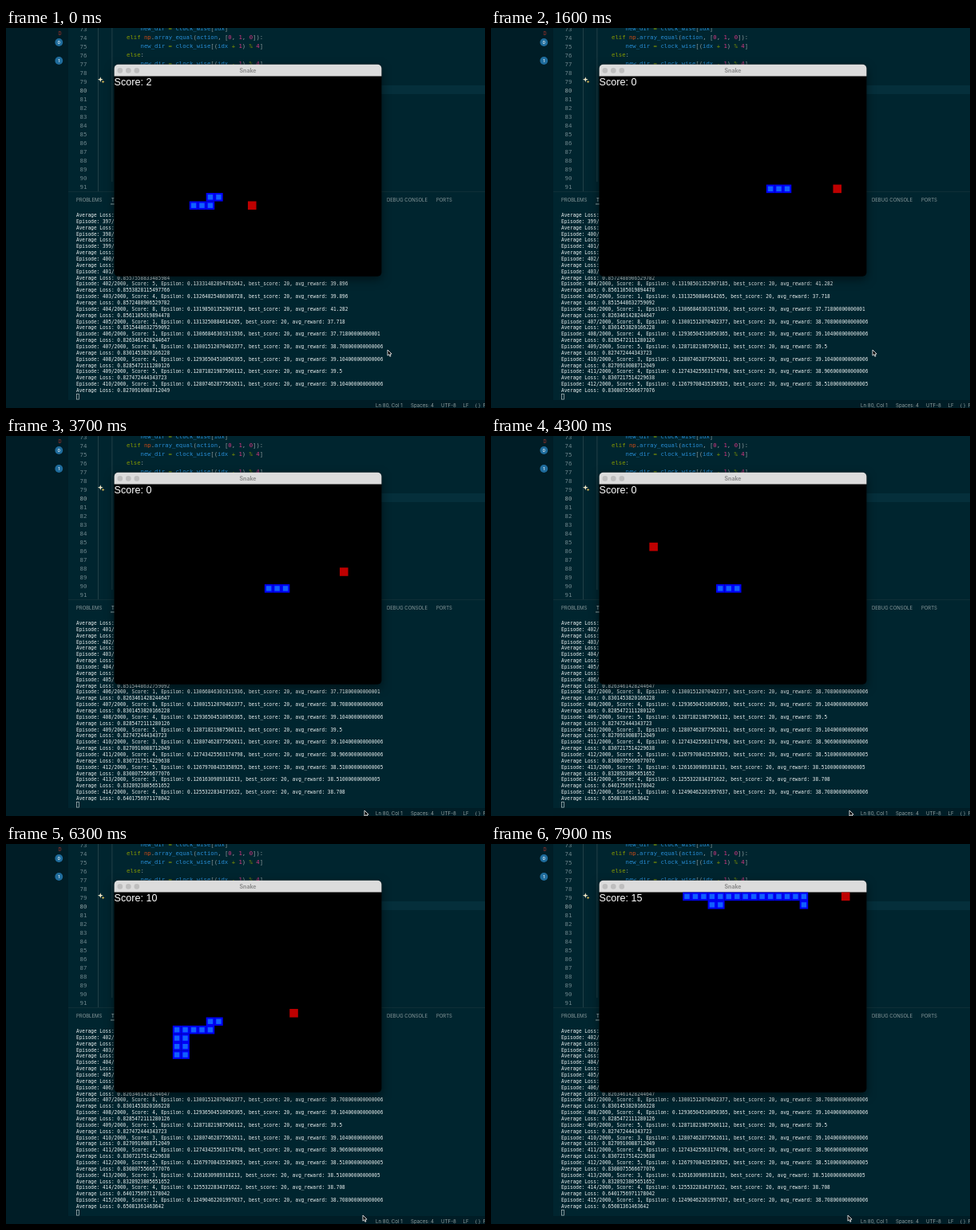
An HTML page with a canvas that plays this animation: 600 px wide and 477 px high, repeating every 8 s.

```html
<!DOCTYPE html>
<html lang="en">
<head>
<meta charset="utf-8">
<title>Snake training</title>
<style>
  html, body { margin: 0; width: 100%; height: 100%; overflow: hidden; background: #00252f; }
  canvas { display: block; width: 600px; height: 477px; }
</style>
</head>
<body>
<canvas id="stage" width="600" height="477"></canvas>
<script>
const ctx = document.getElementById('stage').getContext('2d');
const LOOP = 8000, TICK = 100;
const MONO = '"DejaVu Sans Mono", monospace';
const UI = 'Inter, sans-serif';
const ARIAL = '"Liberation Sans", Arial, sans-serif';

let seed = 7;
const random = () => (seed = (seed * 16807) % 2147483647) / 2147483647;

// Each stop: time, meals on the way, pose from tail to head, food in view.
// A stop without a pose is where the game ends.
const START = '14,12 16,12';
const EPISODES = [
  [[0, 0, '9,15 11,15 11,14 12,14', '16,15'], [600, 2]],
  [[600, 0, START], [1530, 5]],
  [[1530, 0, START], [1600, 0, '17,12 17,13 22,13', '28,13'], [2500, 3]],
  [[2500, 0, START], [2800, 1, '3,11 6,11', '12,11'], [3650, 3]],
  [[3650, 0, START], [3700, 0, '20,12', '27,10'], [4300, 1]],
  [[4300, 0, START],
   [5100, 3, '27,12 27,11 26,11 26,9 25,9', '8,9'],
   [6300, 7, '8,17 8,19 7,19 7,16 11,16 11,15 12,15', '21,14'],
   [7900, 5, '10,0 13,0 13,1 14,1 14,0 24,0 24,1', '29,0'],
   [LOOP, 0]]
].map(buildEpisode);

// score, average reward, average loss
const FIRST = 402, DECAY = 0.995;
let epsilon = 0.13331482894782642;
const LOG = `5 39.896 0.8553828115497766
4 39.896 0.8572488906529782
8 41.282 0.8561105019894478
1 37.718 0.8515448632759092
1 37.71800000000001 0.8263461428244647
8 38.708000000000006 0.8301453820166228
4 39.104000000000006 0.8285472111280126
5 39.5 0.827472444343723
3 39.104000000000006 0.8270910088712049
4 38.906000000000006 0.8307217514229638
5 38.510000000000005 0.8308075566677076
3 38.510000000000005 0.8328923805651652
4 38.708 0.6401756971178042
1 38.708000000000006 0.65081361463642`.split('\n').map((row, i) => {
  const [score, reward, loss] = row.split(' ');
  if (i) epsilon *= DECAY;
  return { loss, stats: `Score: ${score}, Epsilon: ${epsilon}, best_score: 20, avg_reward: ${reward}` };
});

function buildEpisode(stops, index) {
  const cells = [], foods = [], anchors = [];
  let dir = [1, 0], next;

  const step = (axis, goal) => {
    let cell = cells[cells.length - 1];
    while (cell[axis] !== goal) {
      const sign = Math.sign(goal - cell[axis]);
      dir = axis ? [0, sign] : [sign, 0];
      cell = [cell[0] + dir[0], cell[1] + dir[1]];
      cells.push(cell);
    }
  };
  // Keep going ahead if the goal lies there, otherwise turn first.
  const go = goal => {
    if (!cells.length) cells.push(goal);
    const head = cells[cells.length - 1];
    const axis = dir[0] ? 0 : 1;
    const first = (goal[axis] - head[axis]) * dir[axis] > 0 ? axis : 1 - axis;
    step(first, goal[first]);
    step(1 - first, goal[1 - first]);
  };
  const pick = () => {
    const [x, y] = cells[cells.length - 1];
    let food;
    do food = [2 + Math.floor(random() * 28), 2 + Math.floor(random() * 20)];
    while (food[0] === x || food[1] === y);
    return food;
  };
  const eat = () => {
    go(next || pick());
    next = null;
    foods.push(cells.length - 1);
  };
  const point = str => str.split(',').map(Number);

  for (const [time, meals, pose, food] of stops) {
    for (let i = 0; i < meals; i++) eat();
    if (pose) pose.split(' ').map(point).forEach(go);
    else eat();
    anchors.push([time, cells.length - 1]);
    next = food && point(food);
  }
  return { cells, foods, anchors, base: index ? 0 : 2 };
}

// Linear interpolation through [time, ...values] keys.
function along(keys, t) {
  const i = Math.max(1, keys.findIndex(k => t <= k[0]));
  const a = keys[i - 1], b = keys[i];
  const f = (t - a[0]) / (b[0] - a[0]);
  return a.slice(1).map((v, j) => v + (b[j + 1] - v) * f);
}

function rect(x, y, w, h, color) {
  ctx.fillStyle = color;
  ctx.fillRect(x, y, w, h);
}

function disc(x, y, r, color) {
  ctx.fillStyle = color;
  ctx.beginPath();
  ctx.arc(x, y, r, 0, 7);
  ctx.fill();
}

// Drawn large and scaled down to keep fractional glyph widths.
function text(str, x, y, size, color, font = UI, align = 'left', weight = '') {
  ctx.save();
  ctx.translate(x, y);
  ctx.scale(0.1, 0.1);
  ctx.font = `${weight} ${size * 10}px ${font}`;
  ctx.textAlign = align;
  ctx.fillStyle = color;
  ctx.fillText(str, 0, 0);
  ctx.restore();
}

function code(parts, x, y) {
  const colors = { b: '#268bd2', g: '#859900', o: '#cb4b16', p: '#d33682', w: '#8c9c9e' };
  for (const part of parts.split('|')) {
    const str = part.slice(1);
    text(str, x, y, 7.29, colors[part[0]], MONO);
    x += str.length * 4.39;
  }
}

function star(x, y, r, color) {
  ctx.fillStyle = color;
  ctx.beginPath();
  for (let i = 0; i < 8; i++) {
    const d = i % 2 ? r * 0.35 : r, a = i * Math.PI / 4;
    ctx.lineTo(x + d * Math.cos(a), y + d * Math.sin(a));
  }
  ctx.fill();
}

function drawEditor() {
  rect(0, 0, 600, 477, '#00252f');
  rect(0, 0, 78, 477, '#001d26');
  rect(136, 72, 464, 11, '#052f3b');
  rect(115, 0, 0.8, 205, '#2a474e');
  rect(132.5, 0, 0.8, 193, '#2a474e');
  for (let n = 73; n <= 91; n++) {
    text(n, 101.5, 3.5 + (n - 73) * 11, 7.4, n === 80 ? '#93a4a6' : '#6c858b', MONO, 'right');
  }
  const turn = sign => `bnew_dir |g=|b clock_wise|w[(|bidx |g${sign}|p 1|w) |g%|p 4|w]`;
  const lines = [
    'bnew_dir |g=|b clock_wise|w[|bidx|w]',
    'gelif|o np|w.|barray_equal|w(|baction|w, [|p0|w, |p1|w, |p0|w]):',
    turn('+'), 'gelse|w:', turn('-')
  ];
  lines.forEach((line, i) => code(line, i % 2 ? 151 : 168.5, 3.2 + i * 11));
  star(118.3, 64.7, 3.4, '#f3e9c8');
  star(121.6, 67.5, 2, '#e8c65a');

  text('D', 67.5, 9, 5.6, '#b5362c', UI, 'center');
  for (const n of [0, 1]) {
    disc(66.3, 18 + n * 23, 4.9, '#1f6c9c');
    text(n, 66.3, 20 + n * 23, 5.4, '#e4eef2', UI, 'center', 600);
  }
}

function drawPanel(last) {
  const tab = (str, x, color = '#8b9b9d') => text(str, x, 218, 5.95, color);
  rect(78, 205.3, 522, 0.7, '#16343c');
  tab('PROBLEMS', 88);
  tab('TERMINAL', 132, '#d5dcdc');
  rect(131, 220.6, 34, 0.8, '#c0cccc');
  tab('DEBUG CONSOLE', 477);
  tab('PORTS', 539);

  const line = (str, row) => text(str, 88, 237 + row * 7.857, 6.08, '#eaf0f0', MONO);
  const hidden = { loss: '0.8557558833485984', stats: '' };
  for (let i = 0; i < 15; i++) {
    const n = last - 14 + i;
    const { loss, stats } = LOG[n - FIRST] || hidden;
    if (i) line(`Episode: ${n}/2000, ${stats}`, 2 * i - 1);
    line(`Average Loss: ${loss}`, 2 * i);
  }
  ctx.strokeStyle = '#b9c4c5';
  ctx.lineWidth = 0.7;
  ctx.strokeRect(88.4, 459.3, 3.1, 6.8);

  rect(0, 467, 600, 10, '#001d26');
  const status = { 'Ln 80, Col 1': 463, 'Spaces: 4': 507, 'UTF-8': 545, 'LF': 572.5, '{ }': 587.5, 'Python': 597.5 };
  for (const str in status) text(str, status[str], 475.6, 6.15, '#93a1a1');
}

function drawGame(t, { cells, foods, anchors, base }) {
  const head = Math.floor(along(anchors, t)[0] + 1e-6);
  const eaten = foods.filter(i => i <= head).length;
  const score = base + eaten;

  ctx.save();
  ctx.shadowColor = 'rgba(0,0,0,.5)';
  ctx.shadowBlur = 12;
  ctx.shadowOffsetY = 4;
  ctx.fillStyle = '#000';
  ctx.beginPath();
  ctx.roundRect(135.6, 45.7, 334.8, 266, 5);
  ctx.fill();
  ctx.restore();

  ctx.save();
  ctx.clip();
  rect(135, 45, 336, 15.5, '#dcdcdc');
  ctx.restore();
  for (let i = 0; i < 3; i++) disc(142.8 + i * 10.5, 53.4, 3.3, '#bebebe');
  text('Snake', 303, 55.7, 7, '#8c8c8c', UI, 'center', 700);

  const unit = 10.46;
  const block = ([x, y], inset, color) =>
    rect(135.6 + x * unit + inset, 60.6 + y * unit + inset, unit - 2 * inset + 0.1, unit - 2 * inset + 0.1, color);
  const body = cells.slice(Math.max(0, head - score - 2), head + 1);
  for (const cell of body) block(cell, 0, '#0000f6');
  for (const cell of body) block(cell, 2.1, '#1060ff');
  block(cells[foods[eaten]], 0, '#be0000');
  text('Score: ' + score, 135.6, 72, 12.6, '#fff', ARIAL);
}

function drawPointer(t) {
  const keys = [[0, 478, 404], [3400, 478, 404], [3700, 449, 470], [4500, 449, 470], [4700, 447, 466], [LOOP, 447, 466]];
  ctx.save();
  ctx.translate(...along(keys, t));
  ctx.beginPath();
  for (const [x, y] of [[0, 0], [0, 7.2], [1.7, 5.7], [2.9, 8.3], [4, 7.8], [2.9, 5.3], [5.1, 5.1]]) ctx.lineTo(x, y);
  ctx.closePath();
  ctx.fillStyle = '#000';
  ctx.strokeStyle = '#e8e8e8';
  ctx.lineWidth = 0.9;
  ctx.fill();
  ctx.stroke();
  ctx.restore();
}

function draw(t) {
  const begun = EPISODES.filter(e => e.anchors[0][0] <= t);
  drawEditor();
  drawPanel(409 + begun.length);
  drawGame(t, begun[begun.length - 1]);
  drawPointer(t);
}

let start, shown = -1;
function frame(now) {
  start ??= now;
  const tick = Math.floor(((now - start) % LOOP) / TICK);
  if (tick !== shown) {
    shown = tick;
    draw(tick * TICK);
  }
  requestAnimationFrame(frame);
}
draw(0);
requestAnimationFrame(frame);
</script>
</body>
</html>
```
